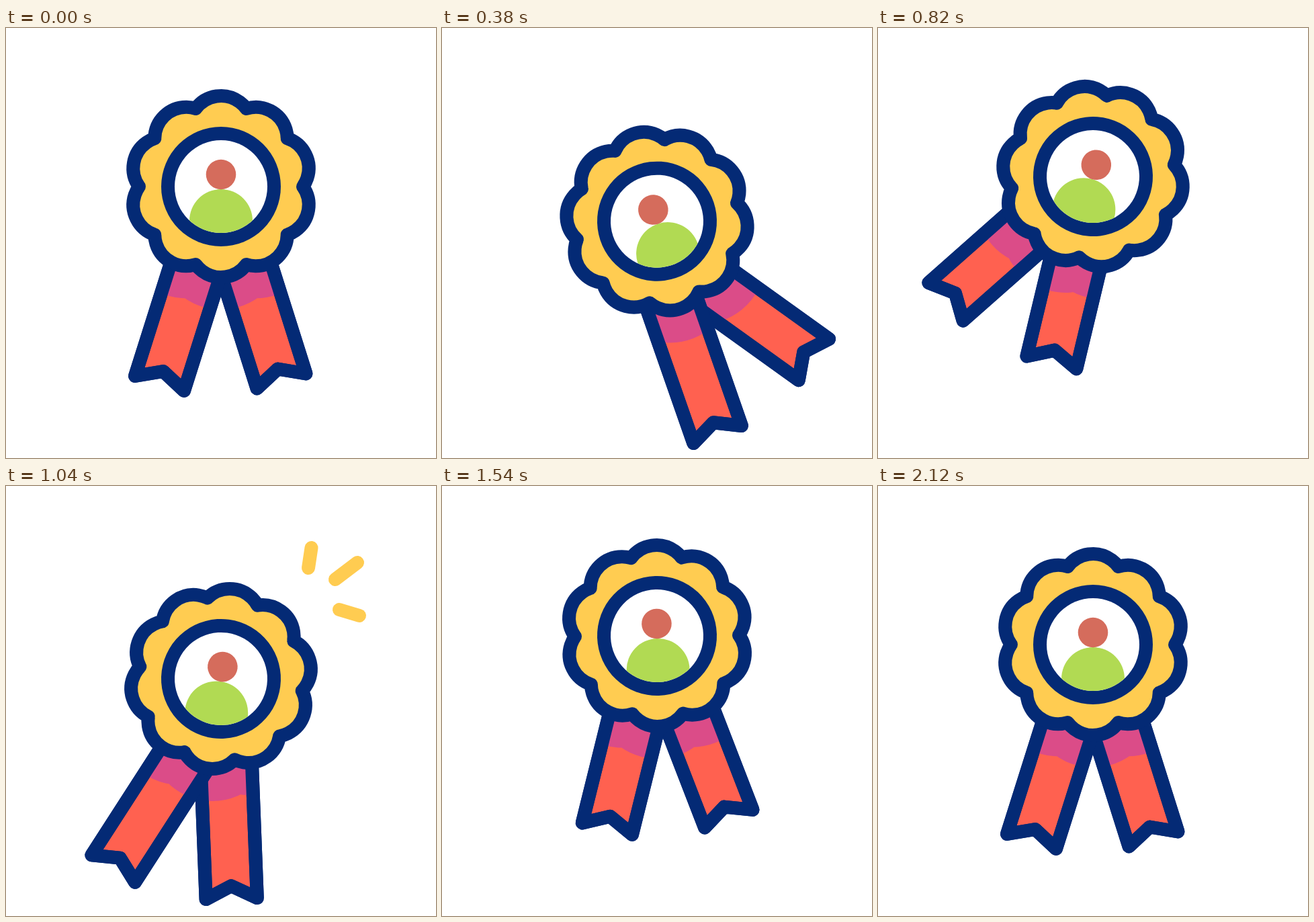
Animation of 640x640 px, one loop 2400 ms. Source, as an HTML page with a canvas:

```html
<!DOCTYPE html>
<html lang="en">
<head>
<meta charset="utf-8">
<title>Swinging rosette</title>
<style>
  html, body { margin: 0; width: 100%; height: 100%; overflow: hidden; background: #fff; }
  canvas { display: block; width: 640px; height: 640px; }
</style>
</head>
<body>
<canvas id="stage" width="640" height="640"></canvas>
<script>
const ctx = document.getElementById('stage').getContext('2d');
const LOOP = 2400, END = 2120, STEP = 20;
const CX = 320, CY = 236, PIVOT = 20;
const RAD = Math.PI / 180, TAU = Math.PI * 2;
const NAVY = '#042a75', YELLOW = '#ffcc51', CORAL = '#ff6150', SHADE = '#db4c88',
      GREEN = '#b1da53', SKIN = '#d56c5c';

const clamp = p => Math.min(1, Math.max(0, p));
const ease = p => (1 - Math.cos(Math.PI * clamp(p))) / 2;

// Rest until start, then swing through the peaks, one per beat, and back to rest at END.
function track(start, first, beat, peaks) {
  const values = [0, ...peaks, 0];
  const time = i => i ? Math.min(first + (i - 1) * beat, END) : start;
  return t => values.slice(1).reduce((sum, v, i) =>
    sum + (v - values[i]) * ease((t - time(i)) / (time(i + 1) - time(i))), 0);
}

const medalY = track(0, 357, 357, [52.5, -32, 52.5, -21, 14.5]);
const ribbonY = track(0, 357, 357, [77, -64, 77, -40, 31]);
const swing = track(0, 400, 455, [-37, 32, -15, 7.4]);
const petalTurn = track(180, 600, 420, [-27.7, 8.5, -1.3, 4.8]);

// Ten round petals that meet in sharp valleys.
const petals = new Path2D();
for (let k = 0; k < 10; k++) {
  const a = (18 + 36 * k) * RAD;
  petals.arc(88 * Math.cos(a), 88 * Math.sin(a), 47, a - 0.932, a + 0.932);
}
petals.closePath();

// A fishtail ribbon hanging from the pivot; side is -1 for left, 1 for right.
function ribbon(side, dx, dy) {
  const tail = [[128, 262], [86, 255], [55, 284]];
  const rise = ([x, y]) => [x - 0.316 * (y - 44), 44];
  const path = new Path2D();
  [...tail, rise(tail[2]), rise(tail[0])].forEach(([x, y]) => path.lineTo(side * x + dx, y + dy));
  path.closePath();
  return path;
}
const ribbons = [ribbon(1, -1.5, -3.5), ribbon(-1, 0, 0)];

// Start point and full travel of each spark.
const sparks = [[450, 122, 9, -60], [490, 139, 66, -50], [496, 184, 60, 18]];

function place(x, y, deg) {
  ctx.setTransform(1, 0, 0, 1, x, y);
  ctx.rotate(deg * RAD);
}

function disc(x, y, r, color) {
  ctx.fillStyle = color;
  ctx.beginPath();
  ctx.arc(x, y, r, 0, TAU);
  ctx.fill();
}

function shape(path, fill, line, width) {
  ctx.fillStyle = fill;
  ctx.fill(path);
  ctx.strokeStyle = line;
  ctx.lineWidth = width;
  ctx.stroke(path);
}

// The shade under the medal is the petal outline with a much wider stroke.
function drawRibbon(path, t, y, turn) {
  const top = CY + PIVOT + ribbonY(t);
  place(CX, top, swing(t));
  shape(path, CORAL, NAVY, 20);
  ctx.save();
  ctx.clip(path);
  place(CX, y, turn);
  shape(petals, SHADE, SHADE, 96);
  ctx.restore();
  place(CX, top, swing(t));
  ctx.strokeStyle = NAVY;
  ctx.lineWidth = 20;
  ctx.stroke(path);
}

function drawMedal(t, y, turn) {
  place(CX, y, turn);
  shape(petals, YELLOW, NAVY, 20);
  place(CX, y, swing(t) / 2);
  disc(0, 0, 89, NAVY);
  disc(0, 0, 69, '#fff');
  ctx.save();
  ctx.clip();
  disc(0, 51, 47, GREEN);
  disc(0, -18, 22.3, SKIN);
  ctx.restore();
}

function drawSparks(t) {
  const head = ease((t - 940) / 200), tail = ease((t - 1040) / 200);
  if (head === tail) return;
  place(0, 0, 0);
  ctx.strokeStyle = YELLOW;
  ctx.lineWidth = 20;
  for (const [x, y, dx, dy] of sparks) {
    ctx.beginPath();
    ctx.moveTo(x + dx * tail, y + dy * tail);
    ctx.lineTo(x + dx * head, y + dy * head);
    ctx.stroke();
  }
}

function draw(t) {
  place(0, 0, 0);
  ctx.fillStyle = '#fff';
  ctx.fillRect(0, 0, 640, 640);
  ctx.lineJoin = ctx.lineCap = 'round';
  const y = CY + medalY(t), turn = petalTurn(t);
  ribbons.forEach(path => drawRibbon(path, t, y, turn));
  drawMedal(t, y, turn);
  drawSparks(t);
}

let start;
function tick(now) {
  start ??= now;
  const t = Math.max(0, now - start) % LOOP;
  draw(Math.floor(t / STEP) * STEP);
  requestAnimationFrame(tick);
}
draw(0);
requestAnimationFrame(tick);
</script>
</body>
</html>
```
